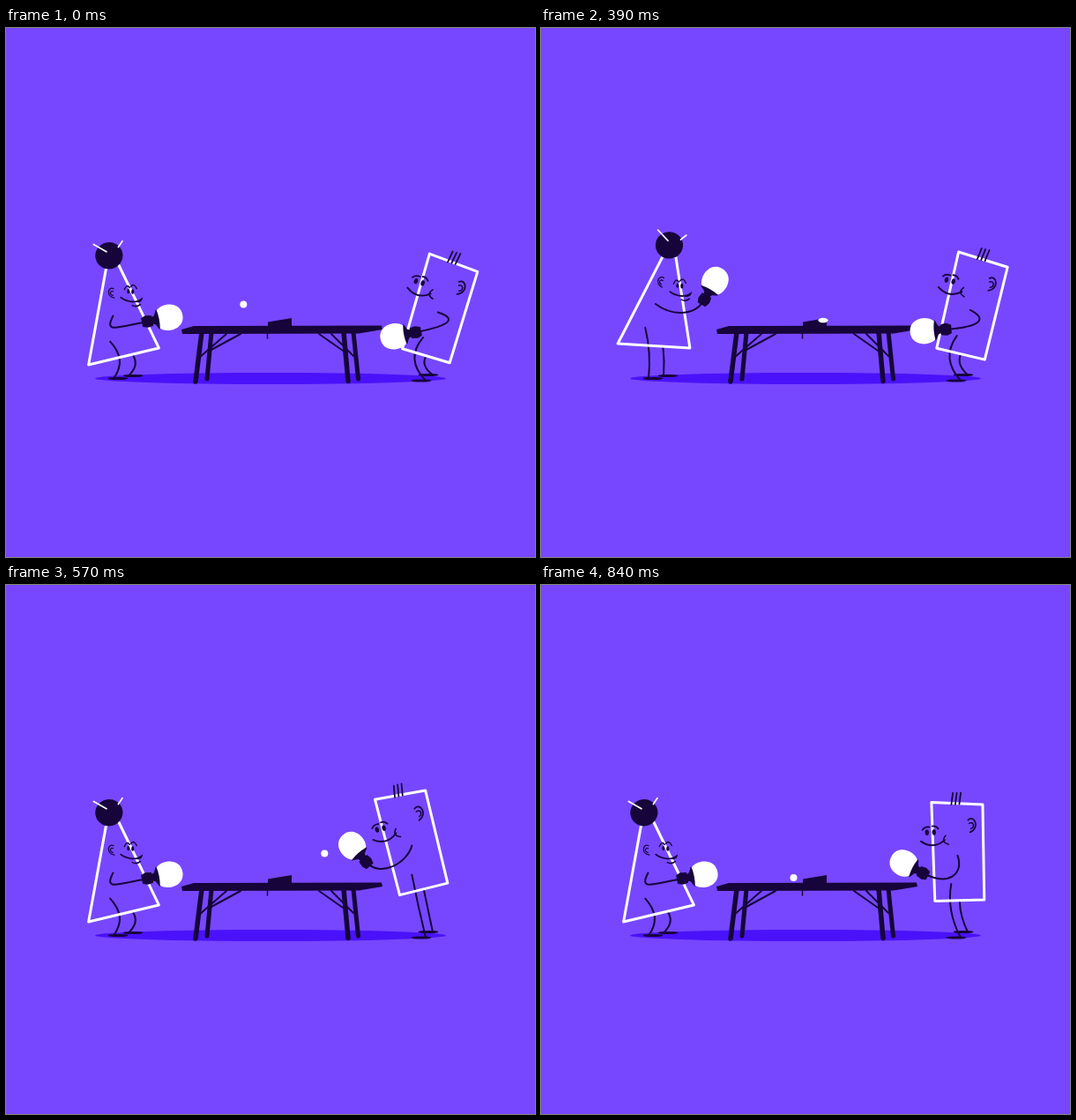
Recreate the animation shown at these times as an HTML page with a canvas. Size 600 by 600 pixels, loop 0.87 s.

```html
<!DOCTYPE html>
<html lang="en">
<head>
<meta charset="utf-8">
<title>Table tennis</title>
<style>
  html, body { margin: 0; width: 100%; height: 100%; overflow: hidden; background: #7747ff; }
  canvas { display: block; width: 600px; height: 600px; }
</style>
</head>
<body>
<canvas id="stage" width="600" height="600"></canvas>
<script>
const ctx = document.getElementById('stage').getContext('2d');
const BG = '#7747ff', SHADE = '#4a12fa', INK = '#16043a', WHITE = '#ffffff';
const LOOP = 870, STEP = 30, HELD = [30, 150], RAD = Math.PI / 180;

// Easing
const mix = (a, b, k) => a + (b - a) * k;
const mixAll = (a, b, k) => a.map((v, i) => mix(v, b[i], k));
const ramp = (t, a, b) => Math.min(1, Math.max(0, (t - a) / (b - a)));
const smooth = (t, a, b) => { const k = ramp(t, a, b); return k * k * (3 - 2 * k); };
const pulse = (t, a, b) => Math.sin(Math.PI * ramp(t, a, b));

// Drawing helpers
function stroke(width, color = INK) {
  ctx.lineWidth = width;
  ctx.strokeStyle = color;
  ctx.stroke();
}

function fill(color = INK) {
  ctx.fillStyle = color;
  ctx.fill();
}

function poly(...points) {
  ctx.beginPath();
  for (let i = 0; i < points.length; i += 2) ctx.lineTo(points[i], points[i + 1]);
  ctx.closePath();
}

function line(x1, y1, x2, y2, width, color) {
  poly(x1, y1, x2, y2);
  stroke(width, color);
}

function curve([x, y, ...rest], width) {
  ctx.beginPath();
  ctx.moveTo(x, y);
  rest.length === 4 ? ctx.quadraticCurveTo(...rest) : ctx.bezierCurveTo(...rest);
  stroke(width);
}

function oval(x, y, rx, ry, color = INK) {
  ctx.beginPath();
  ctx.ellipse(x, y, rx, ry, 0, 0, Math.PI * 2);
  fill(color);
}

function at(x, y, turn, draw) {
  ctx.save();
  ctx.translate(x, y);
  ctx.rotate(turn);
  draw();
  ctx.restore();
}

function ear(x, y, scaleX, scaleY) {
  at(x, y, 0, () => {
    ctx.scale(scaleX, scaleY);
    curve([-4, -6, 3, -12, 10, 3, -2, 8], 1.8);
    curve([-3, -2, 2, -5, 4, 2, -1, 4], 1.5);
  });
}

function paddle() {
  poly(-6, -5, -1, -7, 6, -6, 7, 0, 6, 6, 0, 7, -6, 5);
  fill();
  poly(4, -3, 9, -5, 12, -11, 16, -11, 16, 11, 12, 11, 9, 5, 4, 3);
  fill();
  ctx.beginPath();
  ctx.moveTo(13, -10.5);
  ctx.bezierCurveTo(21, -18, 41, -16, 41, 0);
  ctx.bezierCurveTo(41, 16, 21, 18, 13, 10.5);
  ctx.quadraticCurveTo(15, 0, 13, -10.5);
  fill(WHITE);
}

function table() {
  oval(300, 397.5, 199, 6.5, SHADE);
  ctx.lineCap = 'butt';
  line(222, 345, 215, 401, 5.5);
  line(233, 345, 228, 398, 5);
  line(383, 345, 388, 400.5, 5.5);
  line(394, 345, 399.5, 398, 5);
  ctx.lineCap = 'round';
  line(266, 347, 231, 366, 2);
  line(250, 347, 219, 374, 2);
  line(355, 347, 385, 368, 2);
  line(369, 347, 394, 372, 2);
  poly(199, 342, 213, 338, 426, 337.5, 427, 342, 400, 346.5, 200, 347);
  fill();
  poly(297, 333.5, 324, 329, 324, 342, 297, 342);
  fill();
  line(296.5, 342, 296.5, 352, 1.5);
}

// Bodies are rigid and drawn around their own pivot.
function triangleBody(turn) {
  poly(4, -102, -41, 0, 41, 0, 18.5, -103);
  stroke(3, WHITE);
  oval(10.5, -115, 15.6, 15.2);
  line(-3.5, -131.5, 8.7, -120, 1.7, WHITE);
  line(29, -127.5, 23, -122, 1.7, WHITE);
  ear(3.6, -73, -.75, .75);
  at(25, -71, -turn, () => {
    curve([-7, -1, -4, -8, -1, -3], 1.4);
    curve([0, -4, 4, -9, 7, -2], 1.4);
    oval(-2.5, 1, 1.5, 2.6);
    oval(2.5, 1.5, 1.6, 2.8);
    curve([-11, 8, -6, 12, 3, 13], 1.8);
    ctx.beginPath();
    ctx.moveTo(0, 12);
    ctx.quadraticCurveTo(8, 13, 14, 7.5);
    ctx.quadraticCurveTo(13, 17, 0, 12);
    fill();
    curve([2, 17, 7, 19.5, 11, 16], 1.6);
  });
}

function boxBody() {
  poly(-29, -57, 29, -53, 28, 55, -28, 55);
  stroke(3, WHITE);
  for (const side of [-1, 1]) oval(-31 + side * 4, -23, 2.2, 3.2);
  curve([-40, -26, -37, -30, -32, -29], 1.8);
  curve([-29, -30, -25, -31, -22, -27], 1.8);
  curve([-42, -13, -28, -3, -15, -14], 1.9);
  curve([-14, -19, -20, -12, -11, -9], 1.6);
  ear(16, -30, 1, 1);
  for (const i of [-1, 0, 1]) line(-2 + i * 4.5, -54, i * 4.5, -67, 1.8);
}

// "low" is the crouch, "high" the stretched pose; hands are [x, y, paddle angle].
const leftPlayer = {
  body: triangleBody,
  low: { pivot: [133.5, 372.5], turn: -13.5, hand: [160, 333, -11], elbow: 117 },
  high: { pivot: [128, 360.5], turn: 3.5, hand: [185, 308.5, -60], elbow: 37 },
  hit: [7, 0, 11],
  shoulder: [-1, -47.5],
  legs: [{ hip: [10.5, 1], foot: [139, 394.5], length: 34, bend: 1 },
         { hip: [-11, -20], foot: [122, 397.5], length: 64, bend: .8 }],
  stretch: t => smooth(t, 0, 190) - smooth(t, 390, 570),
  lift: t => smooth(t, 0, 140) - smooth(t, 390, 570),
  swing: t => pulse(t, 150, 390),
};

const boxStretch = t => smooth(t, 360, 510) - ramp(t, 720, LOOP) ** 4;
const rightPlayer = {
  body: boxBody,
  low: { pivot: [492, 319], turn: 16.5, hand: [465, 345, 169], elbow: 18 },
  high: { pivot: [460.4, 291.5], turn: -14, hand: [412, 314.5, 234], elbow: 106 },
  hit: [-9, 0, -14],
  shoulder: [-1, 4],
  legs: [{ hip: [0, 56], foot: [484, 393.5], length: 46, bend: -.4 },
         { hip: [-9, 36], foot: [476, 400], length: 74, bend: -.9 }],
  stretch: boxStretch,
  lift: boxStretch,
  swing: t => pulse(t, 540, 810),
};

function leg([x, y], { foot: [fx, fy], length, bend }) {
  const slack = Math.max(0, length - Math.hypot(fx - x, fy - y));
  curve([x, y, (x + fx) / 2 + slack * bend, (y + fy) / 2, fx, fy], 2);
  oval(fx + Math.sign(bend) * 5, fy, 11.5, 1.6);
}

function arm([x, y], [hx, hy, angle], elbow) {
  const slack = Math.max(0, 60 - Math.hypot(hx - x, hy - y));
  const pull = 18 + .9 * slack, wrist = angle * RAD;
  curve([x, y, x + 22 * Math.cos(elbow), y + 22 * Math.sin(elbow),
    hx - pull * Math.cos(wrist), hy - pull * Math.sin(wrist), hx, hy], 2);
  at(hx, hy, wrist, paddle);
}

function drawPlayer(player, t) {
  const { low, high } = player, k = player.stretch(t), swing = player.swing(t);
  const [px, py] = mixAll(low.pivot, high.pivot, k);
  const turn = mix(low.turn, high.turn, k) * RAD;
  const c = Math.cos(turn), s = Math.sin(turn);
  const place = ([x, y]) => [px + x * c - y * s, py + x * s + y * c];
  const hand = mixAll(low.hand, high.hand, player.lift(t))
    .map((v, i) => v + player.hit[i] * swing);

  for (const limb of player.legs) leg(place(limb.hip), limb);
  at(px, py, turn, () => player.body(turn));
  arm(place(player.shoulder), hand, mix(low.elbow, high.elbow, k) * RAD);
}

// Ball: off a bat it speeds down to the table, off the table it slows towards a bat.
const flights = [
  { start: 240, from: [219.5, 296], pace: [1, 2.5] },
  { start: 390, from: [320, 331.5], pace: [.92, .45] },
  { start: 660, from: [380, 299], pace: [1, 2.5] },
  { start: 840, from: [286.5, 332], pace: [.62, .3] },
];

function ball(t) {
  const time = t < flights[0].start ? t + LOOP : t;
  const i = flights.findLastIndex(f => f.start <= time);
  const { start, from, pace } = flights[i];
  const next = flights[(i + 1) % flights.length];
  const end = next.start > start ? next.start : next.start + LOOP;
  const [x, y] = from.map((v, axis) => mix(v, next.from[axis], ramp(time, start, end) ** pace[axis]));
  const squash = t === 390 ? 1.4 : 1;
  oval(x, y, 4 * squash, 4 / squash, WHITE);
}

function frame(now) {
  let t = Math.floor((now % LOOP) / STEP) * STEP;
  if (HELD.includes(t)) t -= STEP;
  ctx.fillStyle = BG;
  ctx.fillRect(0, 0, 600, 600);
  table();
  drawPlayer(leftPlayer, t);
  drawPlayer(rightPlayer, t);
  ball(t);
}

ctx.lineCap = 'round';
ctx.lineJoin = 'round';
const begin = performance.now();
function tick() {
  frame(performance.now() - begin);
  requestAnimationFrame(tick);
}
tick();
</script>
</body>
</html>
```
